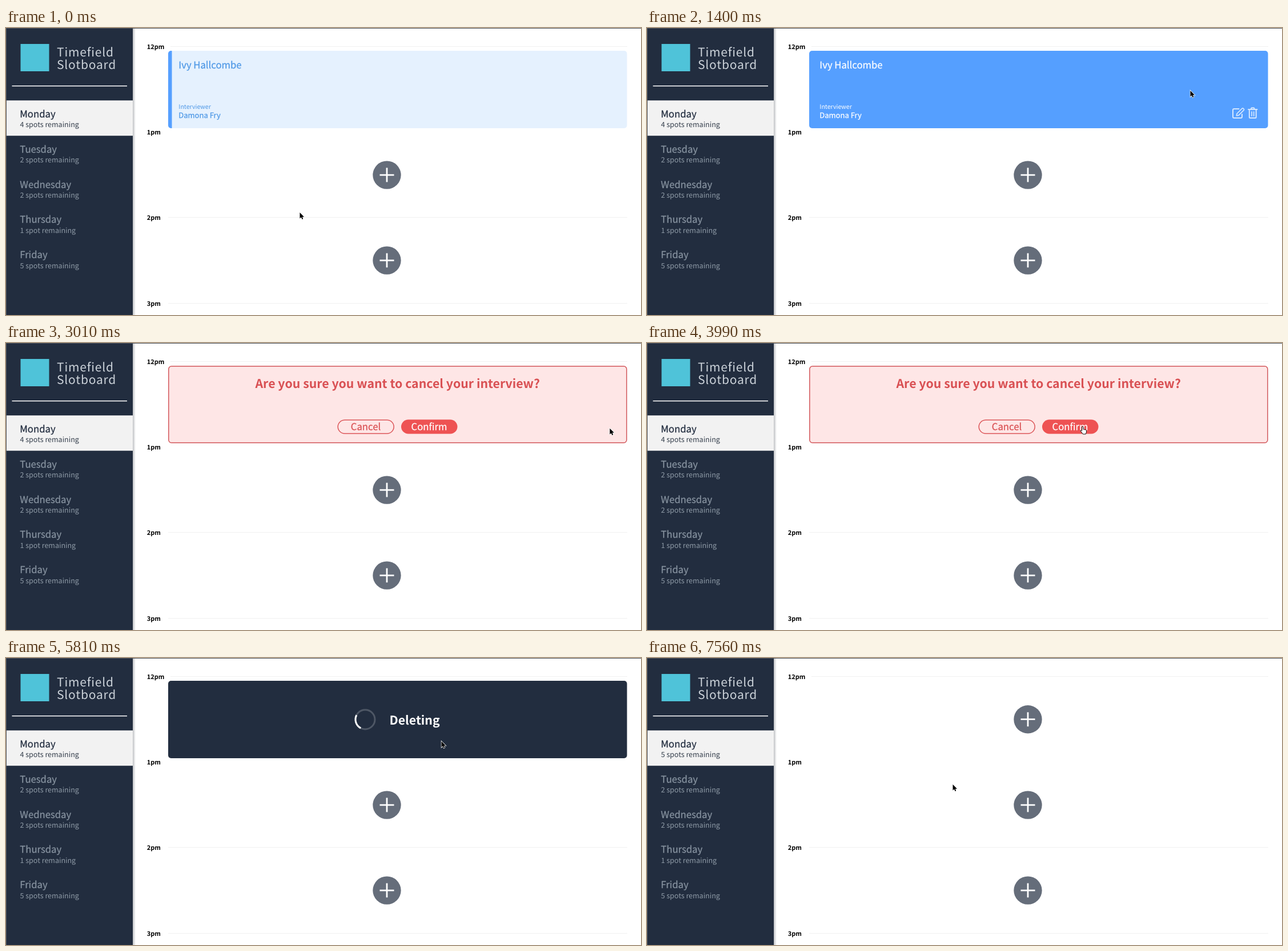
Animation, 1112 px wide and 504 px high, one loop 7630 ms. Source, as an HTML page:

```html
<!DOCTYPE html>
<html lang="en">
<head>
<meta charset="utf-8">
<title>Appointments</title>
<style>
  html, body { margin: 0; width: 100%; height: 100%; overflow: hidden; background: #fff; }
  svg { display: block; width: 100vw; height: 100vh; }
  text {
    font-family: "Noto Sans CJK JP", "Noto Sans CJK SC", "Noto Sans CJK", "Noto Sans", sans-serif;
    text-rendering: geometricPrecision;
    fill: currentColor;
  }
  .light { font-weight: 300; }
  .bold { font-weight: 700; }
  .mid { text-anchor: middle; }
  .title { font-size: 16.7px; }
  .person { font-size: 13px; }
  .title, .person { stroke: currentColor; stroke-width: .25; }
  .note { font-size: 12.5px; }
  .brand { font-size: 21px; letter-spacing: .8px; color: #ccd3da; }
  .hour { font-size: 11px; color: #000; }
  .label { font-size: 10.6px; }
  .headline { font-size: 21.3px; }
  .icon { fill: none; stroke: #fff; stroke-width: 2; stroke-linejoin: round; stroke-linecap: round; }
</style>
</head>
<body>
<svg viewBox="0 0 1112 504">
  <defs>
    <linearGradient id="shade">
      <stop offset="0" stop-color="#bfc1c4"/>
      <stop offset="1" stop-color="#fff"/>
    </linearGradient>
    <g id="plus">
      <circle r="24.7" fill="#656d7a"/>
      <path d="M-12.5 0H12.5M0-12.5V12.5" stroke="#fff" stroke-width="2.8"/>
    </g>
  </defs>
  <rect width="1112" height="504" fill="#fff"/>
  <rect x="222" width="5" height="504" fill="url(#shade)"/>
  <rect width="222" height="504" fill="#222d3f"/>
  <rect x="25.5" y="28" width="50" height="48" fill="#4fc3d9"/>
  <text class="brand light" x="89" y="49.5">Timefield</text>
  <text class="brand light" x="89" y="72">Slotboard</text>
  <rect x="10.5" y="101" width="201.5" height="1.5" fill="#fff"/>
  <g id="days"></g>
  <g id="hours"></g>

  <g id="booked">
    <rect id="card" x="284" y="40" width="803.5" height="136" rx="5"/>
    <path id="edge" d="M290.5 40H289a5 5 0 0 0-5 5V171a5 5 0 0 0 5 5H290.5Z" fill="#559fff"/>
    <g id="details">
      <text class="title" x="302.3" y="71.3">Ivy Hallcombe</text>
      <text class="label light" x="302.3" y="141.6">Interviewer</text>
      <text class="person" x="302.3" y="158">Damona Fry</text>
    </g>
    <g id="tools" class="icon">
      <g opacity=".75">
        <path d="M1036.5 142H1028a2 2 0 0 0-2 2V156a2 2 0 0 0 2 2H1040a2 2 0 0 0 2-2V151.5"/>
        <path d="M1033 150.5L1042 141.3a1.5 1.5 0 0 1 2.2 0L1045 142.2a1.5 1.5 0 0 1 0 2.2L1036 153.3 1032.4 154Z" stroke-width="1.7"/>
      </g>
      <g id="trash">
        <path d="M1053 143H1068.5M1057.5 142.5L1058.7 140.2H1062.8L1064 142.5M1054.8 143.5V156.5a1.5 1.5 0 0 0 1.5 1.5H1065.2a1.5 1.5 0 0 0 1.5-1.5V143.5"/>
        <path d="M1059 147V154.5M1062.6 147V154.5" stroke-width="1.7"/>
      </g>
    </g>
  </g>

  <g id="confirm" color="#d95053">
    <rect x="284.8" y="40.7" width="802" height="134.6" rx="5" fill="#fee6e6" stroke="#d2575b" stroke-width="1.5"/>
    <text class="headline bold mid" x="685.7" y="78.6">Are you sure you want to cancel your interview?</text>
    <rect x="581.2" y="135.2" width="98" height="23.8" rx="11.9" fill="none" stroke="#dc5659" stroke-width="1.5"/>
    <text class="title mid" x="630" y="153.3">Cancel</text>
    <rect x="692" y="134.5" width="98.5" height="25" rx="12.5" fill="#ee5253"/>
    <text class="title mid" x="741" y="153.3" color="#fff">Confirm</text>
  </g>

  <g id="deleting" color="#fff">
    <rect x="284" y="40" width="803.5" height="136" rx="5" fill="#222d3f"/>
    <g fill="none" stroke="#fff" stroke-width="3">
      <circle cx="629" cy="108" r="17" opacity=".2"/>
      <path id="arc" d="M12.02-12.02A17 17 0 0 1 12.02 12.02"/>
    </g>
    <text class="headline bold" x="671.5" y="116.5">Deleting</text>
  </g>

  <use id="empty" href="#plus" x="667" y="107.7"/>

  <path d="M0 .5H1112M.5 0V504" stroke="#4f545c"/>
  <g id="pointer">
    <g id="ring" fill="none">
      <circle r="24" cy="1" stroke="#fff" stroke-opacity=".7" stroke-width="2"/>
      <circle r="23.3" cy="1" stroke="#111" stroke-width="1.3"/>
    </g>
    <path id="arrow" d="M-.5 0V10.6L2 8.3 3.5 12 5.3 11.2 3.8 7.7H7Z" fill="#000" stroke="#fff" stroke-width="1.4" paint-order="stroke"/>
    <path id="hand" d="M-1.3 7V.8a1.2 1.2 0 0 1 2.4 0V4.5l4 .8q1.6 .4 1.5 2l-.4 3.2-1 2.5H.4L-3.6 7.6q-.6-1.4 .8-1.3z" fill="#fff" stroke="#111" stroke-width="1"/>
  </g>
</svg>
<script>
const LOOP = 7630, STEP = 70;
const PRESS_TRASH = 2520, ASK = 2660, PRESS_CONFIRM = 4550, DELETE = 4620, DONE = 5880;
const SPIN = 1050, SPIN_MARK = 4760, SPIN_ANGLE = 162;

const $ = id => document.getElementById(id);
const show = (id, on) => { $(id).style.display = on ? '' : 'none'; };

const days = [['Monday', '4 spots'], ['Tuesday', '2 spots'], ['Wednesday', '2 spots'],
              ['Thursday', '1 spot'], ['Friday', '5 spots']];
$('days').innerHTML = '<rect y="127.2" width="222" height="62" fill="#f2f2f2"/>' +
  days.map(([name, spots], i) => {
    const y = 156.7 + 61.9 * i;
    return `<text class="title" x="24.3" y="${y}" color="${i ? '#8793a0' : '#222d3f'}">${name}</text>
      <text class="note light" x="24.5" y="${y + 17.5}" color="${i ? '#8f9ba7' : '#343e4b'}">${spots} remaining</text>`;
  }).join('');
const mondaySpots = document.querySelector('.note');

$('hours').innerHTML = ['12pm', '1pm', '2pm', '3pm'].map((hour, i) => {
  const y = 32.5 + 150.2 * i;
  const rule = i === 1 ? '' : `<path d="M${i ? 284 : 288} ${Math.floor(y) + .5}H1088" stroke="#f1f1f1"/>`;
  const add = i === 1 || i === 2 ? `<use href="#plus" x="667" y="${108.1 + 150 * i}"/>` : '';
  return `<text class="hour bold" x="246.7" y="${y + 4.4}">${hour}</text>${rule}${add}`;
}).join('');

const linear = p => p;
const easeIn = p => p * p;
const easeOut = p => 1 - (1 - p) ** 2;
const easeBoth = p => p * p * (3 - 2 * p);

// time, x, y, easing on the way there
const path = [
  [0, 515, 324], [560, 515, 324], [1190, 787, 96, easeBoth], [1260, 787, 96],
  [1400, 952, 110, linear], [1540, 983, 116, easeOut], [1680, 983, 116],
  [2310, 1063, 150, easeBoth], [2870, 1063, 150], [3640, 908, 147, easeIn],
  [3990, 763, 147, easeOut], [6300, 763, 146], [7070, 769, 226, easeBoth],
  [7560, 536, 222, easeBoth], [LOOP, 536, 222]
];

function pointerAt(t) {
  const i = path.findIndex(key => key[0] > t);
  const [t0, x0, y0] = path[i - 1];
  const [t1, x1, y1, ease = linear] = path[i];
  const p = ease((t - t0) / (t1 - t0));
  return [x0 + (x1 - x0) * p, y0 + (y1 - y0) * p];
}

function draw(time) {
  const t = Math.floor(time % LOOP / STEP) * STEP;
  const [x, y] = pointerAt(t);
  const booked = t < ASK, asking = !booked && t < DELETE;
  const hover = booked && y < 176;
  const onTrash = hover && x > 1052 && y > 138;
  const onButton = asking && x > 692 && x < 790;

  show('booked', booked);
  show('confirm', asking);
  show('deleting', t >= DELETE && t < DONE);
  show('empty', t >= DONE);
  mondaySpots.textContent = `${t < DONE ? 4 : 5} spots remaining`;

  $('card').setAttribute('fill', hover ? '#559fff' : '#e5f1fe');
  $('details').setAttribute('color', hover ? '#fff' : '#4e98e6');
  show('edge', !hover);
  show('tools', hover);
  $('trash').setAttribute('opacity', onTrash ? 1 : .75);

  const angle = SPIN_ANGLE + (t - SPIN_MARK) / SPIN * 360;
  $('arc').setAttribute('transform', `translate(629 108) rotate(${angle})`);

  $('pointer').setAttribute('transform', `translate(${x} ${y})`);
  show('hand', onTrash || onButton);
  show('arrow', !onTrash && !onButton);
  show('ring', (t >= PRESS_TRASH && t < ASK) || (t >= PRESS_CONFIRM && t < DELETE));
}

const start = performance.now();
function tick() {
  draw(performance.now() - start);
  requestAnimationFrame(tick);
}
tick();
</script>
</body>
</html>
```
